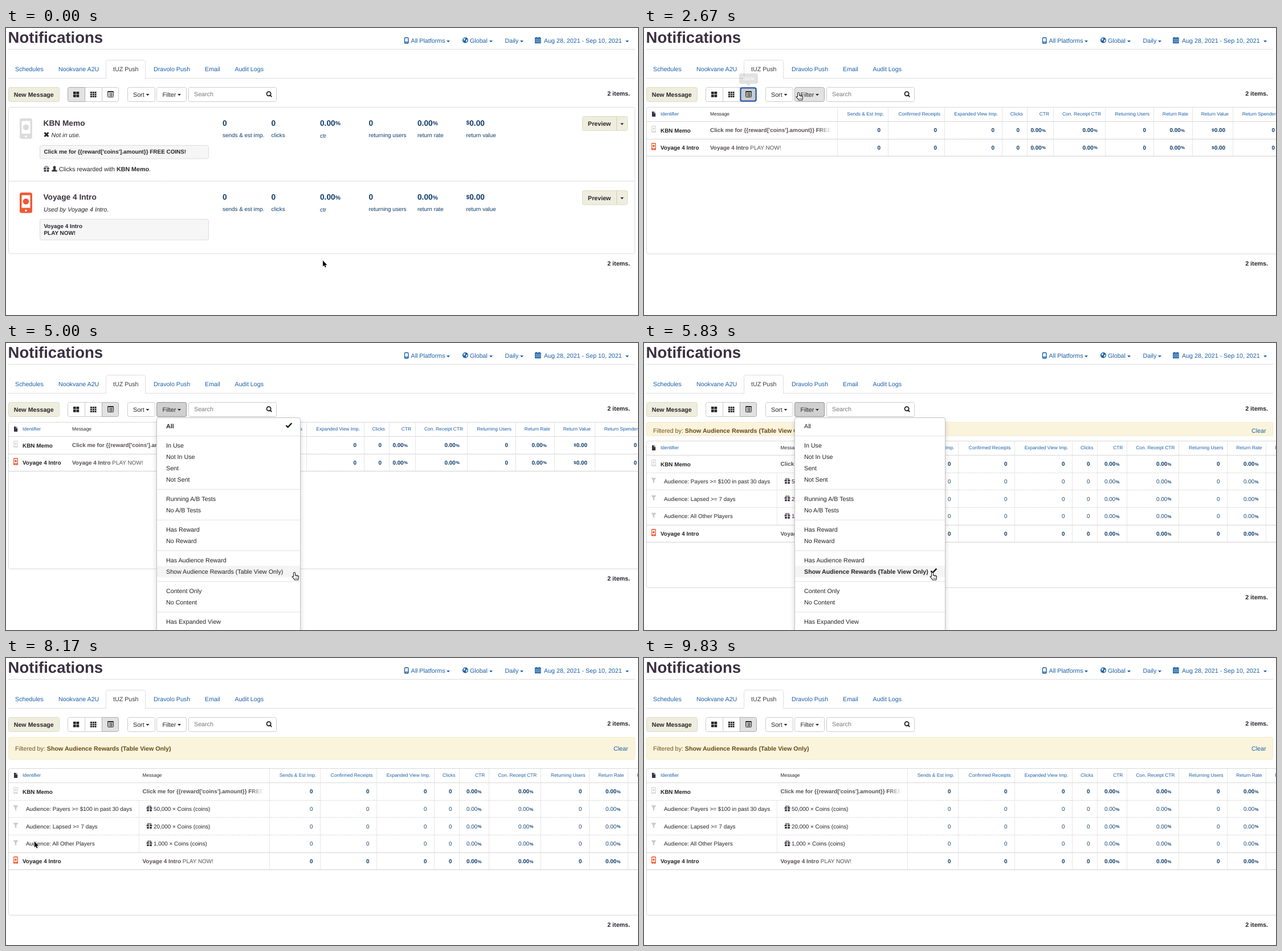
An HTML page with a canvas for the animation above (9990 ms loop, 1109 by 505 pixels).

```html
<!DOCTYPE html>
<html lang="en">
<head>
<meta charset="utf-8">
<title>Notifications</title>
<style>
html, body { margin: 0; width: 100%; height: 100%; overflow: hidden; background: #fff; }
canvas { display: block; width: 1109px; height: 505px; }
</style>
</head>
<body>
<canvas id="stage"></canvas>
<script>
const W = 1109, H = 505, LOOP = 9990, STEPS = 60;
const canvas = document.getElementById('stage');
const c = canvas.getContext('2d');
const ratio = window.devicePixelRatio || 1;
canvas.width = W * ratio;
canvas.height = H * ratio;

const LINK = '#1a5fa6', NAVY = '#0d3b69', INK = '#262328', DARK = '#3b3040', LINE = '#ddd', ORANGE = '#ee5b32';
const MUTED = '#575156';
const BODY = 10.7, SMALL = 9.92, TINY = 8.4, BIG = 13.7;
const DEMO = 'KBN Memo', LAUNCH = 'Voyage 4 Intro';
const PROMO = "Click me for {{reward['coins'].amount}} FREE COINS!";

// Moments of the clicks, in ms
const TABLE_AT = 1990, MENU_AT = 2990, FILTER_AT = 5600, CLOSE_AT = 6800, SLIDE = 400;

const path = [[0, 556, 409], [500, 556, 409], [1500, 184, 115], [2330, 184, 115], [2660, 271, 114],
  [3300, 274, 116], [4500, 506, 404], [6200, 506, 404], [6780, 130, 419], [7500, 130, 419],
  [8658, -3, 259], [8820, -40, 235], [LOOP, -40, 235]];

const columns = [['Sends & Est Imp.', 428], ['Confirmed Receipts', 527], ['Expanded View Imp.', 628],
  ['Clicks', 672], ['CTR', 718, '%'], ['Con. Receipt CTR', 809, '%'], ['Returning Users', 894],
  ['Return Rate', 962, '%'], ['Return Value', 1033, '$'], ['Return Spenders', 1120]];

const menuGroups = [['All'], ['In Use', 'Not In Use', 'Sent', 'Not Sent'], ['Running A/B Tests', 'No A/B Tests'],
  ['Has Reward', 'No Reward'], ['Has Audience Reward', 'Show Audience Rewards (Table View Only)'],
  ['Content Only', 'No Content'], ['Has Expanded View']];

const clamp = v => Math.max(0, Math.min(1, v));

function cursorAt(t) {
  const i = path.findIndex(p => p[0] > t);
  const [t0, x0, y0] = path[i - 1], [t1, x1, y1] = path[i];
  const p = (t - t0) / (t1 - t0), e = p * p * (3 - 2 * p);
  return { x: x0 + (x1 - x0) * e, y: y0 + (y1 - y0) * e };
}

// Draws text centred on y and returns the x where it ends.
function text(str, x, y, size = BODY, color = INK, style = '', align = 'left') {
  c.font = `${style} ${size}px "Liberation Sans", Arial, Helvetica, sans-serif`;
  c.textRendering = 'geometricPrecision';
  c.textAlign = align;
  c.fillStyle = color;
  c.fillText(str, x, y + size * .355);
  return x + c.measureText(str).width;
}

function rect(x, y, w, h, color) {
  c.fillStyle = color;
  c.fillRect(x, y, w, h);
}

function box(x, y, w, h, fill, stroke, r = 3, width = 1) {
  c.beginPath();
  c.roundRect(x, y, w, h, r);
  if (fill) { c.fillStyle = fill; c.fill(); }
  if (stroke) { c.strokeStyle = stroke; c.lineWidth = width; c.stroke(); }
}

function line(x1, y1, x2, y2, color = LINE, dash = []) {
  c.setLineDash(dash);
  c.strokeStyle = color;
  c.lineWidth = 1;
  c.beginPath();
  c.moveTo(x1, y1);
  c.lineTo(x2, y2);
  c.stroke();
  c.setLineDash([]);
}

const rule = (y, color, dash) => line(4, Math.round(y) + .5, W, Math.round(y) + .5, color, dash);

function disc(x, y, r, color) {
  c.fillStyle = color;
  c.beginPath();
  c.arc(x, y, r, 0, 7);
  c.fill();
}

function shape(d, x, y, fill, stroke, width = 1) {
  const p = new Path2D(d);
  c.save();
  c.translate(x, y);
  if (fill) { c.fillStyle = fill; c.fill(p); }
  if (stroke) { c.strokeStyle = stroke; c.lineWidth = width; c.stroke(p); }
  c.restore();
}

const caret = (x, y, color = INK) => shape('M-3 -1.5H3L0 1.7Z', x, y, color);
const check = (x, y) => shape('M-5 0L-2 3.2L4.8 -4', x, y, null, '#111', 2.4);
const funnel = (x, y) => shape('M-4.5 -5H4.5L1.2 -.5V4.5L-1.2 3V-.5Z', x, y, '#c9c9c9');

function phone(x, y, w, h, color) {
  box(x, y, w, h, color, null, w * .16);
  rect(x + w * .16, y + h * .13, w * .68, h * .62, '#fff');
  disc(x + w / 2, y + h * .44, w * .24, color);
  disc(x + w / 2, y + h * .88, w * .08, '#fff');
}

function gift(x, y) {
  for (const side of [-1, 1]) {
    const left = x + (side < 0 ? -4.9 : .7);
    rect(left, y - 1.8, 4.2, 2.3, DARK);
    rect(left + (side < 0 ? .6 : 0), y + 1.5, 3.6, 3.3, DARK);
    c.strokeStyle = DARK;
    c.lineWidth = 1;
    c.beginPath();
    c.ellipse(x + side * 2, y - 3.4, 1.6, 1.1, side * .5, 0, 7);
    c.stroke();
  }
}

function header() {
  text('Notifications', 3.6, 15.8, 27.5, DARK, 'bold');
  line(4, 37.5, 1104, 37.5);
  box(699.5, 17, 6.5, 10, null, LINK, 1.5, 1.4);
  rect(700, 24, 6, 1.5, LINK);
  disc(806, 21.5, 5, LINK);
  shape('M-3.4 -2.6L0 -4L-.3 -1L-2.4 1.4ZM1 -.4L3.8 -1.2L3.2 2L1 3.8Z', 806, 21.5, '#e3edf6');
  text('All Platforms', 710.5, 22, BODY, LINK);
  text('Global', 814, 22, BODY, LINK);
  text('Daily', 875.5, 22, BODY, LINK);
  text('Aug 28, 2021 - Sep 10, 2021', 944, 22, BODY, LINK);
  [776, 851, 905, 1090].forEach(x => caret(x, 23.5, LINK));
  rect(928, 16.8, 10.6, 10.2, LINK);
  rect(930, 16, 1.6, 1, LINK);
  rect(935, 16, 1.6, 1, LINK);
  for (let i = 0; i < 3; i++) rect(928.8, 19.4 + i * 2.3, 9, .8, '#dbe7f2');

  line(4, 88.5, 1104, 88.5);
  box(175.5, 56.5, 69, 36, '#fff', LINE);
  rect(174, 89, 72, 6, '#fff');
  rect(176, 87, 68, 3, '#fff');
  [['Schedules', 16], ['Nookvane A2U', 92], ['tUZ Push', 188], ['Dravolo Push', 259], ['Email', 349], ['Audit Logs', 401.5]]
    .forEach(([label, x], i) => text(label, x, 72.3, BODY, i === 2 ? '#3c3a3e' : LINK));
}

function toolbar(t, cur) {
  const over = (x, w) => cur.y > 104 && cur.y < 130 && cur.x >= x && cur.x < x + w;
  const open = t >= MENU_AT && t < CLOSE_AT;
  const inTable = t >= TABLE_AT;
  const button = (x, w, pressed, r = 3) => {
    const lit = pressed || over(x, w);
    box(x + .5, 104.5, w, 25, pressed || (lit ? '#e2e2e2' : '#fff'), lit ? '#adadad' : '#ccc', r);
  };

  box(4.5, 104.5, 89, 25, '#efeede', '#dcdac8');
  text('New Message', 13.7, 117, BODY, INK, 'bold');

  button(138, 30, null, 0);
  button(108, 30, inTable ? null : '#e2e2e2', [3, 0, 0, 3]);
  button(168, 29, inTable ? '#e2e2e2' : null, [0, 3, 3, 0]);
  if (inTable && t < MENU_AT) box(169.5, 105.5, 27, 23, '#ccc', '#1d56b5', 3, 2);
  for (let i = 0; i < 4; i++) rect(118 + i % 2 * 5.5, 112 + (i >> 1) * 5.3, 4.7, 4.4, '#222');
  for (let i = 0; i < 9; i++) rect(148 + i % 3 * 3.8, 112 + (i / 3 | 0) * 3.6, 2.9, 2.8, '#222');
  box(178.5, 111.5, 10, 10, null, '#222', 1);
  rect(178.5, 111, 10, 2, '#222');
  for (let i = 0; i < 3; i++) {
    rect(180, 114.4 + i * 2.2, 1.2, 1.1, '#222');
    rect(182, 114.4 + i * 2.2, 5, 1.1, '#222');
  }

  button(213, 48);
  text('Sort', 223, 117);
  caret(248.5, 117.5);
  button(264, 52, open ? '#d0d0d0' : null);
  if (open) box(264.5, 104.5, 52, 25, null, '#949494');
  text('Filter', 274.5, 117);
  caret(304, 117.5);
  box(320.5, 104.5, 154, 25, '#fff', '#ccc');
  text('Search', 330, 116.3, BODY, '#777');
  shape('M3.4 -.8A3.6 3.6 0 1 1 -3.8 -.8A3.6 3.6 0 1 1 3.4 -.8M2.4 1.8L5 4.6', 461.3, 116.5, null, '#222', 1.8);
  text('2 items.', 1095, 115.3, BODY, INK, 'bold', 'right');
}

function card(y, name, color) {
  phone(24, y + 20, 22, 36, color);
  text(name, 65.5, y + 27.8, BIG, DARK, 'bold');
  ['sends & est imp.', 'clicks', 'ctr', 'returning users', 'return rate', 'return value'].forEach((label, i) => {
    let x = 380 + i * 85.5;
    text(label, x, y + (i === 2 ? 50 : 49), SMALL, NAVY);
    if (i === 5) x = text('$', x, y + 27.5, 10.3, NAVY, 'bold');
    const money = i === 2 || i > 3;
    const end = text(money ? '0.00' : '0', x, y + 27.8, BIG, NAVY, 'bold');
    if (i === 2 || i === 4) text('%', end, y + 28.5, 10.3, NAVY, 'bold');
  });
  box(1011.5, y + 16.5, 79, 25, '#efeede', '#dcdac8');
  line(1071.5, y + 17, 1071.5, y + 41, '#d2d0be');
  text('Preview', 1021, y + 29.5, BODY, INK, 'bold');
  caret(1081, y + 30);
}

function cards() {
  box(4.5, 139.5, 1099, 257.5, '#fff', LINE);
  line(4, 269.5, 1103, 269.5);
  card(139, DEMO, '#dcdcdc');
  shape('M-3.4 -3.4L3.4 3.4M3.4 -3.4L-3.4 3.4', 71, 187.5, null, '#222', 2.8);
  text('Not in use.', 79.5, 188.3, BODY, INK, 'italic');
  box(59.5, 206.5, 296, 23.5, '#f6f6f6', LINE);
  text(PROMO, 66.5, 217.5, SMALL, INK, 'bold');
  gift(71, 248);
  shape('M-5 5Q-5 2.6 -1.4 1.6Q-2.6 0 -2.4 -2.4Q-2 -5 0 -5T2.4 -2.4Q2.6 0 1.4 1.6Q5 2.6 5 5Z', 85, 247.5, DARK);
  let x = text('Clicks rewarded with ', 93, 248, BODY);
  x = text(DEMO, x, 248, BODY, INK, 'bold');
  text('.', x, 248);

  card(269.5, LAUNCH, ORANGE);
  text(`Used by ${LAUNCH}.`, 66, 318.8, BODY, INK, 'italic');
  box(59.5, 336.5, 296, 36.5, '#f6f6f6', LINE);
  text(LAUNCH, 66.5, 348.5, SMALL, INK, 'bold');
  text('PLAY NOW!', 66.5, 360.5, SMALL, INK, 'bold');
}

function alertBar(p) {
  const h = 39 * p;
  box(4.5, 139.5, 1099, h, '#fbf4dc', '#f4e9cc');
  c.save();
  c.beginPath();
  c.rect(4, 139, 1100, h);
  c.clip();
  const y = 147.5 + 11.4 * p;
  const x = text('Filtered by: ', 16, y, BODY, '#70521f');
  text(menuGroups[4][1], x, y, BODY, '#66491a', 'bold');
  text('Clear', 1066, y, BODY, LINK);
  c.restore();
}

function values(y, edge, weight, color) {
  columns.forEach(([, right, unit], i) => {
    let x = edge(right, i) - 13;
    if (unit === '%') {
      text('%', x, y + .6, 7.5, color, 'bold', 'right');
      x -= 7.2;
    }
    text(unit ? '0.00' : '0', x, y, SMALL, color, weight, 'right');
    if (unit === '$') text('$', x - 19.5, y + .3, 7.5, color, weight, 'right');
  });
}

function table(filtered, dy) {
  const edge = (right, i) => right + (filtered ? (i > 3 ? 129.4 : 123.4) : 0);
  const msgX = filtered ? 239.5 : 116, subRows = filtered ? 3 : 0;
  const bottom = 225.5 + subRows * 30.7;
  c.save();
  c.translate(0, dy);
  box(4.5, 139.5, 1120, 258, '#fff', '#d8d8d8');

  shape('M-3 -4.5H.5V-1.5H3.2V4.5H-3ZM1.3 -4.5L3.2 -2.3H1.3Z', 17, 151.5, DARK);
  text('Identifier', 29, 151.5, TINY, LINK);
  text('Message', msgX, 151.5, TINY, INK);
  columns.forEach(([label, right], i) => {
    const x = edge(right, i);
    text(label, x - 7, 151.5, TINY, LINK, '', 'right');
    line(Math.round(x) + .5, 140, Math.round(x) + .5, bottom, '#e6e6e6');
  });
  const first = filtered ? 462.5 : 339.5;
  line(first, 140, first, bottom, '#e6e6e6');
  rule(164, '#d8d8d8');

  phone(13, 172, 8, 12, '#dcdcdc');
  text(DEMO, 29, 180, SMALL, '#222', 'bold');
  values(179.5, edge, 'bold', NAVY);
  c.save();
  c.beginPath();
  c.rect(msgX, 166, 210.5, 28);
  c.clip();
  text(PROMO, msgX, 179.2, SMALL, MUTED, 'bold');
  const fade = c.createLinearGradient(msgX + 190, 0, msgX + 212, 0);
  fade.addColorStop(0, 'rgba(255,255,255,0)');
  fade.addColorStop(1, '#fff');
  rect(msgX + 190, 166, 21, 28, fade);
  c.restore();

  const audiences = [['Payers >= $100 in past 30 days', '50,000'], ['Lapsed >= 7 days', '20,000'], ['All Other Players', '1,000']];
  for (let i = 0; i < subRows; i++) {
    const y = 210.3 + i * 30.7, [who, coins] = audiences[i];
    rule(y - 15.6, LINE, [3, 1]);
    funnel(17, y - 1);
    text('Audience: ' + who, 35, y, SMALL, INK);
    gift(251.5, y - .5);
    text(coins + ' × Coins (coins)', 259, y, SMALL, INK);
    values(y, edge, '', '#164674');
  }
  if (filtered) line(233.5, 195, 233.5, 287, LINE, [2, 1]);

  const y = 210.2 + subRows * 30.7;
  rule(y - 15.5, '#d4d4d4');
  phone(13, y - 8, 8, 12.5, ORANGE);
  text(LAUNCH, 29, y, SMALL, '#222', 'bold');
  const x = text(LAUNCH, msgX, y, SMALL, MUTED, 'bold');
  text(' PLAY NOW!', x, y, SMALL, MUTED);
  values(y, edge, 'bold', NAVY);
  rule(bottom - .5, '#d0d0d0');
  c.restore();
}

function menu(filtered, cur) {
  const w = filtered ? 264 : 252, chosen = filtered ? menuGroups[4][1] : 'All';
  c.save();
  c.shadowColor = 'rgba(0,0,0,.2)';
  c.shadowBlur = 9;
  c.shadowOffsetY = 4;
  box(264.5, 131.5, w, 420, '#fff');
  c.restore();
  box(264.5, 131.5, w, 420, null, '#c4c4c4');
  let y = 146;
  for (const group of menuGroups) {
    for (const label of group) {
      if (Math.abs(cur.y - y) < 10 && cur.x > 265 && cur.x < 265 + w) rect(265, y - 10, w - 1, 20, '#f4f4f4');
      text(label, 281, y, BODY, '#222', label === chosen ? 'bold' : '');
      if (label === chosen) check(265 + w - 20.5, y - 1);
      y += 19.85;
    }
    line(265, Math.round(y - 3) + .5, 264 + w, Math.round(y - 3) + .5, '#e3e3e3');
    y += 14.4;
  }
}

function tooltip(alpha) {
  if (alpha <= 0) return;
  c.save();
  c.globalAlpha = alpha * .9;
  box(167, 80, 33, 18, '#000', null, 3);
  shape('M-4 0H4L0 4Z', 183.5, 98, '#000');
  c.globalAlpha = 1;
  text('Table', 183.5, 89, 9.2, '#fff', '', 'center');
  c.restore();
}

function pointer({ x, y }, hand) {
  c.lineJoin = 'round';
  if (hand) {
    shape('M-1.5 7V1Q-1.5 -.5 0 -.5T1.5 1V5Q5 4.6 7.5 6.2V9Q7.5 11 6.4 13H.6Q-1 10 -3.8 7.6Q-3.8 5.6 -1.5 7Z', x, y, '#fff', '#222', 1.1);
    shape('M3.4 5V7.4M5.5 5.5V7.6M1.8 9V11.5M3.6 9V11.5M5.3 9V11.5', x, y, null, '#333', .7);
  } else {
    const arrow = 'M0 0V10.6L2.4 8.5L4 12.2L5.7 11.5L4.2 7.9H7.4Z';
    shape(arrow, x, y, null, '#fff', 1.6);
    shape(arrow, x, y, '#000');
  }
}

function draw(t) {
  const cur = cursorAt(t);
  const filtered = t >= FILTER_AT, open = t >= MENU_AT && t < CLOSE_AT;
  const slide = .5 - .5 * Math.cos(Math.PI * clamp((t - FILTER_AT) / SLIDE));
  c.setTransform(ratio, 0, 0, ratio, 0, 0);
  rect(0, 0, W, H, '#fff');
  header();
  toolbar(t, cur);
  if (t < TABLE_AT) cards();
  else {
    if (filtered) alertBar(slide);
    table(filtered, Math.round(55 * slide));
  }
  text('2 items.', 1095, 414.3 + Math.round(55 * slide), BODY, INK, 'bold', 'right');
  if (open) menu(filtered, cur);
  tooltip(Math.min(clamp((t - 1400) / 150), clamp((2685 - t) / 160)));
  const overToolbar = cur.y > 103 && cur.y < 130 && cur.x > 108 && cur.x < 317;
  pointer(cur, overToolbar || (open && cur.x > 265 && cur.x < 529));
}

function tick() {
  const step = Math.floor(performance.now() % LOOP / LOOP * STEPS);
  draw(step * LOOP / STEPS);
  requestAnimationFrame(tick);
}
tick();
</script>
</body>
</html>
```
